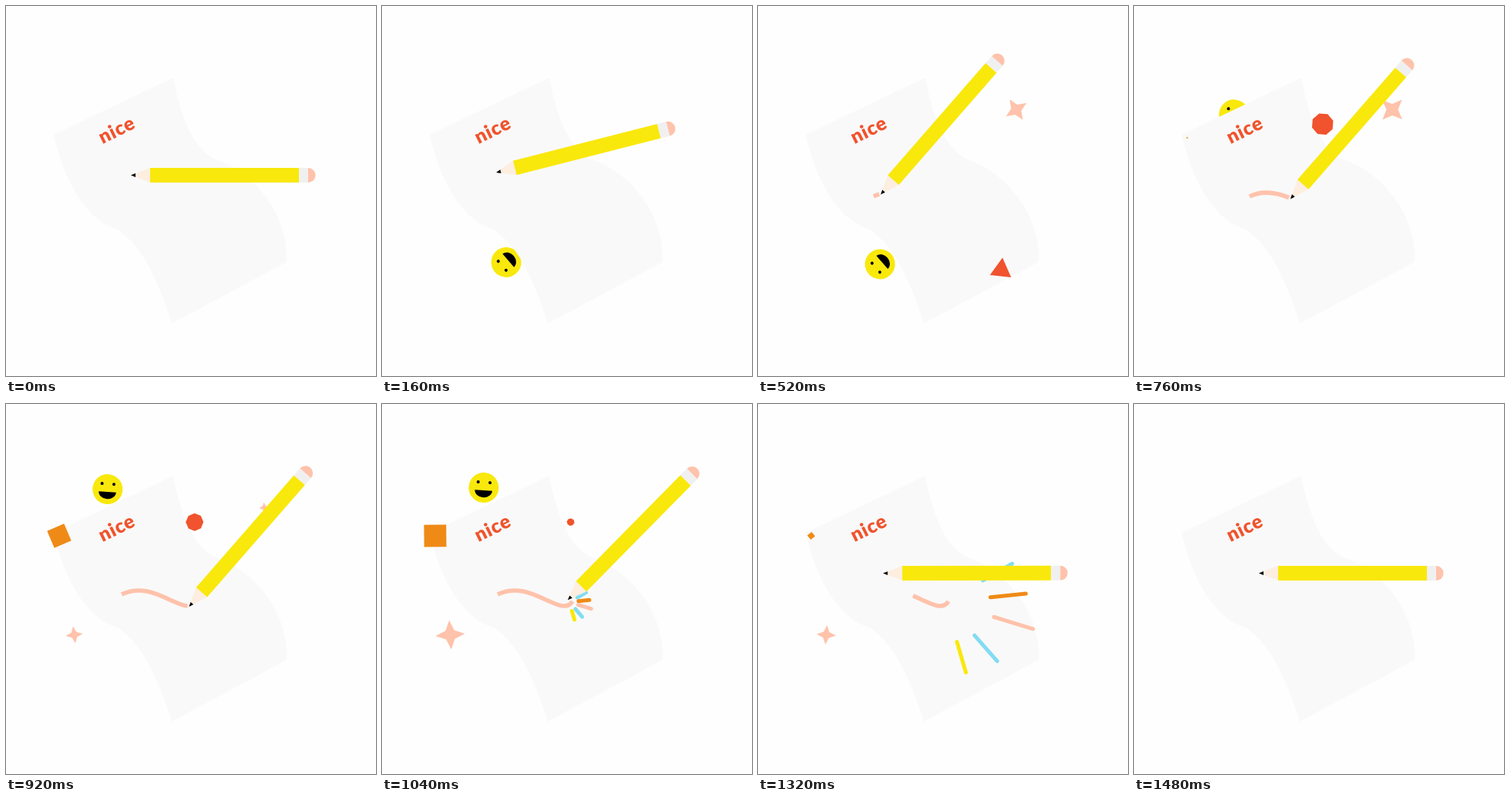
Recreate the animation shown at these times as an HTML page. Size 480 by 480 pixels, loop 1560 ms.

```html
<!DOCTYPE html>
<html lang="en">
<head>
<meta charset="utf-8">
<style>
  html, body { margin: 0; height: 100%; overflow: hidden; background: #fefefe; }
  svg { display: block; width: 100%; height: 100%; }
  text { font: 900 25px Lato, sans-serif; letter-spacing: .8px; text-anchor: middle; fill: #f0532d; }
</style>
</head>
<body>
<svg viewBox="0 0 480 480">
  <defs>
    <g id="face">
      <circle r="19.5" fill="#f9e80c"/>
      <circle cx="-7.7" cy="-7" r="2"/>
      <circle cx="7.7" cy="-7" r="2"/>
      <path d="M-11.3 3.5H11.3A11.3 9.2 0 0 1-11.3 3.5Z"/>
    </g>
  </defs>
  <use href="#face" class="smiley"/>
  <use href="#face" class="smiley"/>
  <path fill="#f9f9f9" d="M62 167L217 93C228 150 245 187 272 199C325 217 368 275 364 332L215 412C198 355 172 302 140 288C100 275 72 215 62 167Z"/>
  <text transform="translate(144.5 162.5) rotate(-26.5)" y="6.5">nice</text>
  <g id="shapes"></g>
  <path id="wave" fill="none" stroke="#ffc2ab" stroke-width="5.5" d="M150 247C175 235 198 247 215 255C230 262 241 266 247 256"/>
  <g id="rays" transform="translate(243 257)" stroke-width="5" stroke-linecap="round"></g>
  <g id="pencil">
    <path fill="#fdeee0" d="M0 0L25-9.5V9.5Z"/>
    <path d="M0 0L6-2.4V2.4Z"/>
    <path fill="#f9e80c" d="M25-9.5H218V9.5H25Z"/>
    <path fill="#f0f0f0" d="M218-9.5H230V9.5H218Z"/>
    <path fill="#ffc2ab" d="M230-9.5a9.5 9.5 0 0 1 0 19Z"/>
  </g>
</svg>
<script>
const LOOP = 1560, STEP = 40, TILT = -48.9;
const RED = '#f0532d', PINK = '#ffc2ab', BLUE = '#82dcf3', ORANGE = '#ef8a17', YELLOW = '#f9e80c';
const $ = id => document.getElementById(id);
const unit = v => Math.min(1, Math.max(0, v));
const sine = x => (1 - Math.cos(Math.PI * x)) / 2;
const mix = (a, b, p) => a + (b - a) * p;
const rad = Math.PI / 180;

function add(parent, tag, attrs) {
  const el = document.createElementNS('http://www.w3.org/2000/svg', tag);
  for (const key in attrs) el.setAttribute(key, attrs[key]);
  return parent.appendChild(el);
}

// Points on a unit circle; radii alternate between 1 and inner
function polygon(n, inner = 1) {
  return Array.from({ length: n }, (_, i) => {
    const r = i % 2 ? inner : 1, a = i * 2 * Math.PI / n;
    return `${(r * Math.cos(a)).toFixed(4)},${(r * Math.sin(a)).toFixed(4)}`;
  }).join(' ');
}

// Cubic entry over 400 ms, quadratic exit
const enter = u => 1 - (1 - unit(u / 400)) ** 3;
const leave = (u, start, length) => unit((u - start) / length) ** 2;

const smileys = [
  { start: 0, x: 145.5, y: 346, turn: -131 },
  { start: 640, x: 132, y: 108, turn: 4 }
];
const smileyEls = document.querySelectorAll('.smiley');

const shapes = [
  { start: 112, x: 315.5, y: 342.5, r: 19.5, fill: RED, points: polygon(3), angle: 70, spin: -.083 },
  { start: 370, x: 335, y: 134.5, r: 21, fill: PINK, points: polygon(8, .42), angle: -33, spin: 0, exitTurn: -90 },
  { start: 490, x: 244.7, y: 153.2, r: 15, fill: RED, points: polygon(8), angle: -3, spin: .11 },
  { start: 752, x: 69, y: 171, r: 21, fill: ORANGE, points: polygon(4), angle: -9.5, spin: .1875 },
  { start: 833, x: 88.5, y: 299.5, r: 21.5, fill: PINK, points: polygon(8, .42), angle: -11, spin: .033 }
];
for (const s of shapes) s.el = add($('shapes'), 'polygon', { points: s.points, fill: s.fill });

const rays = [[-29.9, 100, BLUE], [-6, 105, ORANGE], [17, 119, PINK], [48.7, 102, BLUE], [73.7, 95, YELLOW]]
  .map(([angle, reach, stroke]) => ({ reach, el: add($('rays'), 'line', { stroke, transform: `rotate(${angle})` }) }));

const wave = $('wave'), waveLength = wave.getTotalLength();

function drawSmiley(s, el, t) {
  const u = t - s.start;
  const depth = 96 * unit(1 - enter(u) + leave(u, 373, 350));
  const a = s.turn * rad;
  el.setAttribute('transform',
    `translate(${s.x - depth * Math.sin(a)} ${s.y + depth * Math.cos(a)}) rotate(${s.turn})`);
}

function drawShape(s, t) {
  const u = t - s.start, out = leave(u, 255, 360);
  const angle = s.angle + s.spin * u + (s.exitTurn || 0) * out;
  s.el.setAttribute('transform',
    `translate(${s.x} ${s.y}) rotate(${angle}) scale(${s.r * unit(enter(u) - out)})`);
}

function drawWave(t) {
  const u = Math.max(0, t - 470);
  const head = Math.min(waveLength, .15 * u + .00011 * u * u);
  const tail = waveLength * leave(t, 1120, 280);
  wave.setAttribute('stroke-dasharray', `0 ${tail} ${Math.max(0, head - tail)} 999`);
  wave.style.visibility = head > tail ? 'visible' : 'hidden';
  return head;
}

function drawRay({ reach, el }, t) {
  const outer = reach * (1 - (1 - unit((t - 1000) / 300)) ** 2);
  const inner = mix(12, reach, leave(t, 1100, 310));
  el.setAttribute('x1', inner);
  el.setAttribute('x2', outer);
  el.style.visibility = outer > inner ? 'visible' : 'hidden';
}

function drawPencil(t, head) {
  const lift = sine(unit(t / 440)), back = sine(unit((t - 980) / 350));
  let { x, y } = wave.getPointAtLength(head + 2);
  y += 1;
  if (t < 470) {
    const bend = (a, c, b) => mix(mix(a, c, lift), mix(c, b, lift), lift);
    x = bend(162, 130.6, x);
    y = bend(219.5, 205.6, y);
  }
  $('pencil').setAttribute('transform',
    `translate(${mix(x, 162, back)} ${mix(y, 219.5, back)}) rotate(${TILT * lift * (1 - back)})`);
}

function frame() {
  const t = Math.floor(performance.now() % LOOP / STEP) * STEP;
  smileys.forEach((s, i) => drawSmiley(s, smileyEls[i], t));
  shapes.forEach(s => drawShape(s, t));
  rays.forEach(r => drawRay(r, t));
  drawPencil(t, drawWave(t));
  requestAnimationFrame(frame);
}
frame();
</script>
</body>
</html>
```
